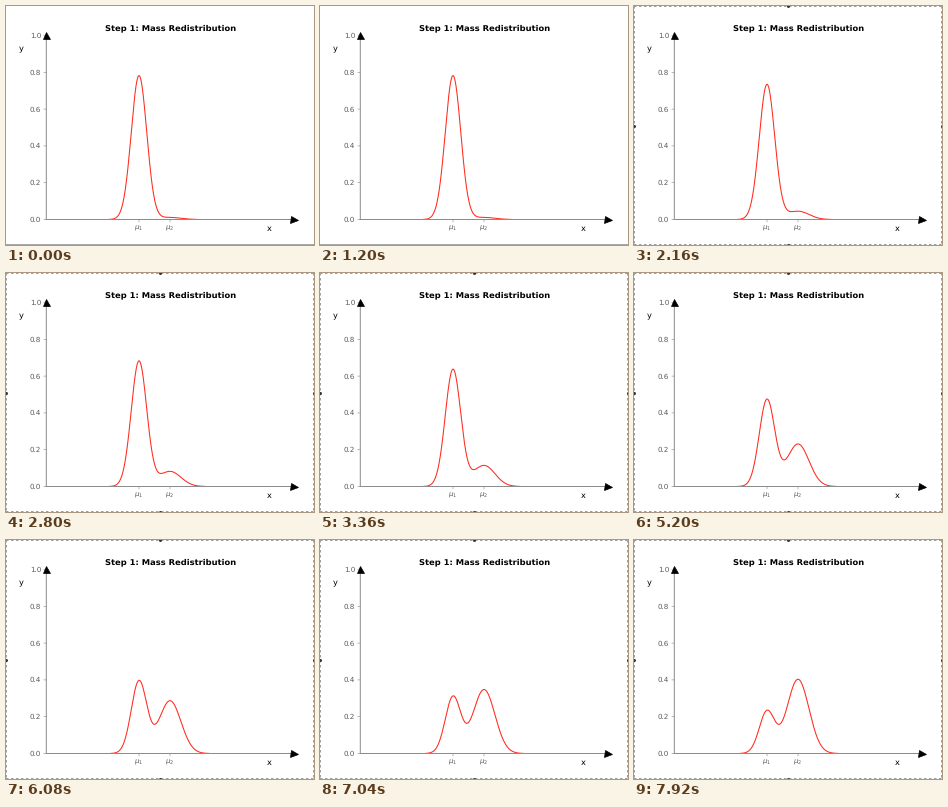
Write a matplotlib script that moves like this. It is 308 px wide and 239 px high and loops after 8000 ms.

```python
import numpy as np
import matplotlib
import matplotlib.pyplot as plt
from matplotlib.animation import FuncAnimation

matplotlib.rcParams["text.hinting"] = "none"
matplotlib.rcParams["font.family"] = "DejaVu Sans"
matplotlib.rcParams["path.snap"] = False

W, H, DPI = 308, 239, 64
PX = 72 / DPI               # points per pixel
STEP, FRAMES = 80, 100
LEFT, RIGHT, TOP, BASE = 40.3, 288, 29.5, 213.5
GREY, TEXT, RED = "#8c8c8c", "#5c5c5c", "#ff2b1e"
MU1, MU2, S1, S2 = -2, 0, 0.5, 0.706
BORDER_START = 1520

fig = plt.figure(figsize=(W / DPI, H / DPI), dpi=DPI, facecolor="white")
ax = fig.add_axes([0, 0, 1, 1])
ax.set_xlim(0, W)
ax.set_ylim(H, 0)
ax.axis("off")


def to_x(v):
    return 164 + v * 15.5


def to_y(v):
    return BASE - v * (BASE - TOP)


def line(xs, ys, color=GREY, width=1.0, **kw):
    return ax.plot(xs, ys, color=color, lw=width * PX, **kw)[0]


def label(x, y, s, size, color="black", ha="center", **kw):
    ax.text(x, y, s, fontsize=size * PX, color=color, ha=ha, va="baseline", **kw)


def normal(x, mu, s):
    return np.exp(-((x - mu) / s) ** 2 / 2) / (s * np.sqrt(2 * np.pi))


# Axes, ticks and labels
line([LEFT] * 2, [TOP, BASE], zorder=4)
line([LEFT, RIGHT], [BASE] * 2, zorder=4)
for v in np.arange(0, 1.1, 0.2):
    line([LEFT - 2.4, LEFT], [to_y(v)] * 2, width=0.6)
    label(35.2, to_y(v) + 2.4, f"{v:.1f}", 7.1, TEXT, ha="right")
for i, mu in enumerate((MU1, MU2), 1):
    line([to_x(mu)] * 2, [BASE, BASE + 2.4], width=0.6)
    label(to_x(mu), 223.4, rf"$\mu_{i}$", 6.95, TEXT)
for x, y, mark in ((LEFT, 29.2, "^"), (RIGHT, BASE, ">")):
    ax.plot(x, y, mark, color="black", ms=7 * PX, mew=0.7 * PX, zorder=5)

label(164.3, 24.5, "Step 1: Mass Redistribution", 8.36, weight="bold")
label(263.3, 225, "x", 8.3)
label(15, 45, "y", 8.3)

# Edge line first, then a dashed selection frame with handles
edge = line([0, W], [238.5] * 2, "#a8a8a8")
frame = [
    line(xs, ys, "#a0a0a0", dashes=(2.5, 2.5))
    for xs, ys in (
        ([0, W], [0.5, 0.5]),
        ([0, W], [238.5, 238.5]),
        ([0.5, 0.5], [0, H]),
        ([307.5, 307.5], [0, H]),
    )
]
for x, y in ((154, 0), (154, H), (0, 119.5), (W, 119.5)):
    frame += ax.plot(x, y, "o", color="#333333", ms=3 * PX, mew=0, zorder=6)

grid = np.linspace(-8, 8, 1200)
curve = line([], [], RED, 1.05, zorder=3)


def draw(i):
    t = i * STEP
    w = np.interp(t, [1440, 2160, 3360, 7920], [0.02, 0.08, 0.203, 0.714])
    y = (1 - w) * normal(grid, MU1, S1) + w * normal(grid, MU2, S2)
    curve.set_data(to_x(grid), np.where(y > 5e-4, to_y(y), np.nan))
    selected = t >= BORDER_START
    edge.set_visible(not selected)
    for part in frame:
        part.set_visible(selected)
    return [curve, edge, *frame]


anim = FuncAnimation(fig, draw, frames=FRAMES, interval=STEP,
                     repeat=True, repeat_delay=0, blit=False)
plt.show()
```
